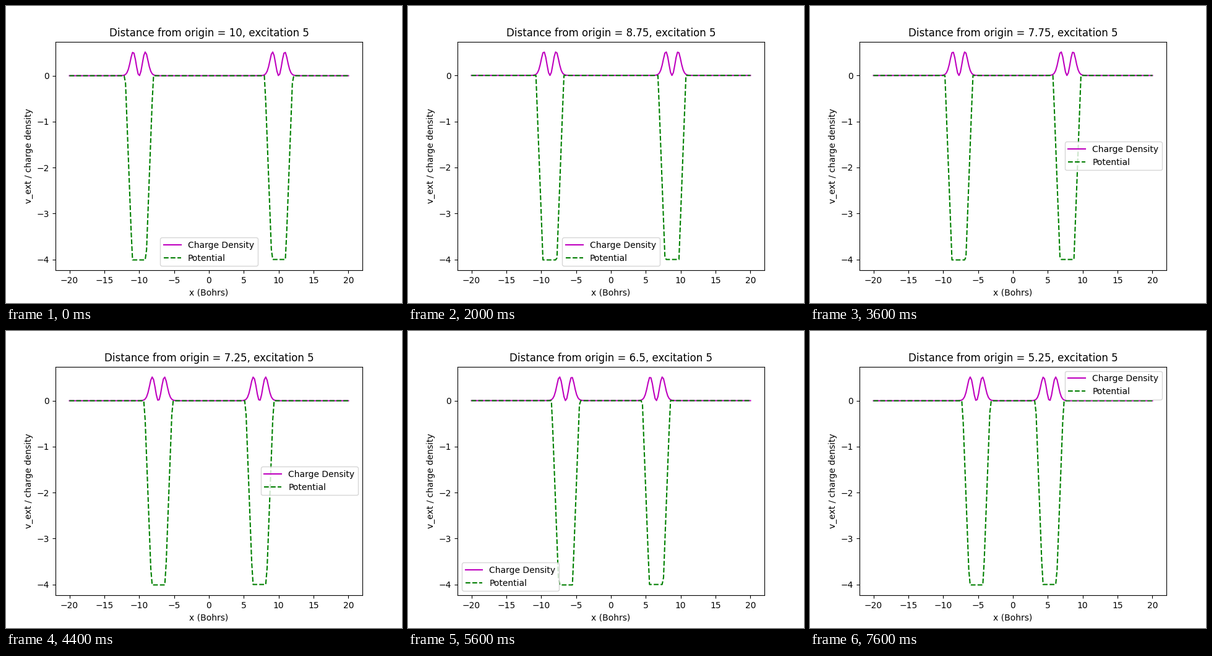
A matplotlib script that plays this animation: 640x480 px, repeating every 8000 ms.

```python
import numpy as np
import matplotlib.pyplot as plt
from matplotlib.animation import FuncAnimation

FRAMES = 20
INTERVAL = 400
X = np.linspace(-20, 20, 200)


def well(u, depth):
    """Flat-bottomed well with linear walls between |u| = 1 and |u| = 2."""
    return -depth * np.clip(2 - np.abs(u), 0, 1)


def first_excited_density(depth=4.0, half_width=7.0, points=561):
    """Density of the first excited state of one isolated well."""
    u = np.linspace(-half_width, half_width, points)
    h = u[1] - u[0]
    hop = np.full(points - 1, -0.5 / h**2)
    hamiltonian = (np.diag(well(u, depth) + 1 / h**2)
                   + np.diag(hop, 1) + np.diag(hop, -1))
    _, states = np.linalg.eigh(hamiltonian)
    return u, states[:, 1] ** 2 / h


U, RHO = first_excited_density()


def density(distance):
    return sum(np.interp(X - c, U, RHO, left=0, right=0)
               for c in (-distance, distance))


def potential(distance):
    # The left well is slightly deeper, which lifts the degeneracy.
    return well(X + distance, 4.01) + well(X - distance, 4.0)


def legend_place(n):
    if n < 8:
        return "lower center"
    if n < 14:
        return "center right"
    return "lower left" if n < 19 else "upper right"


plt.rcParams["font.family"] = "DejaVu Sans"
fig, ax = plt.subplots(figsize=(6.4, 4.8), dpi=100)


def draw(n):
    distance = 10 - n * 0.25 if n else 10
    ax.clear()
    ax.plot(X, density(distance), "m-", label="Charge Density")
    ax.plot(X, potential(distance), "g--", label="Potential")
    ax.set_title(f"Distance from origin = {distance}, excitation 5")
    ax.set_xlabel("x (Bohrs)")
    ax.set_ylabel("v_ext / charge density")
    ax.legend(loc=legend_place(n))
    return ax.get_children()


anim = FuncAnimation(fig, draw, frames=FRAMES, init_func=lambda: [],
                     interval=INTERVAL, repeat=True, repeat_delay=0)
plt.show()
```
